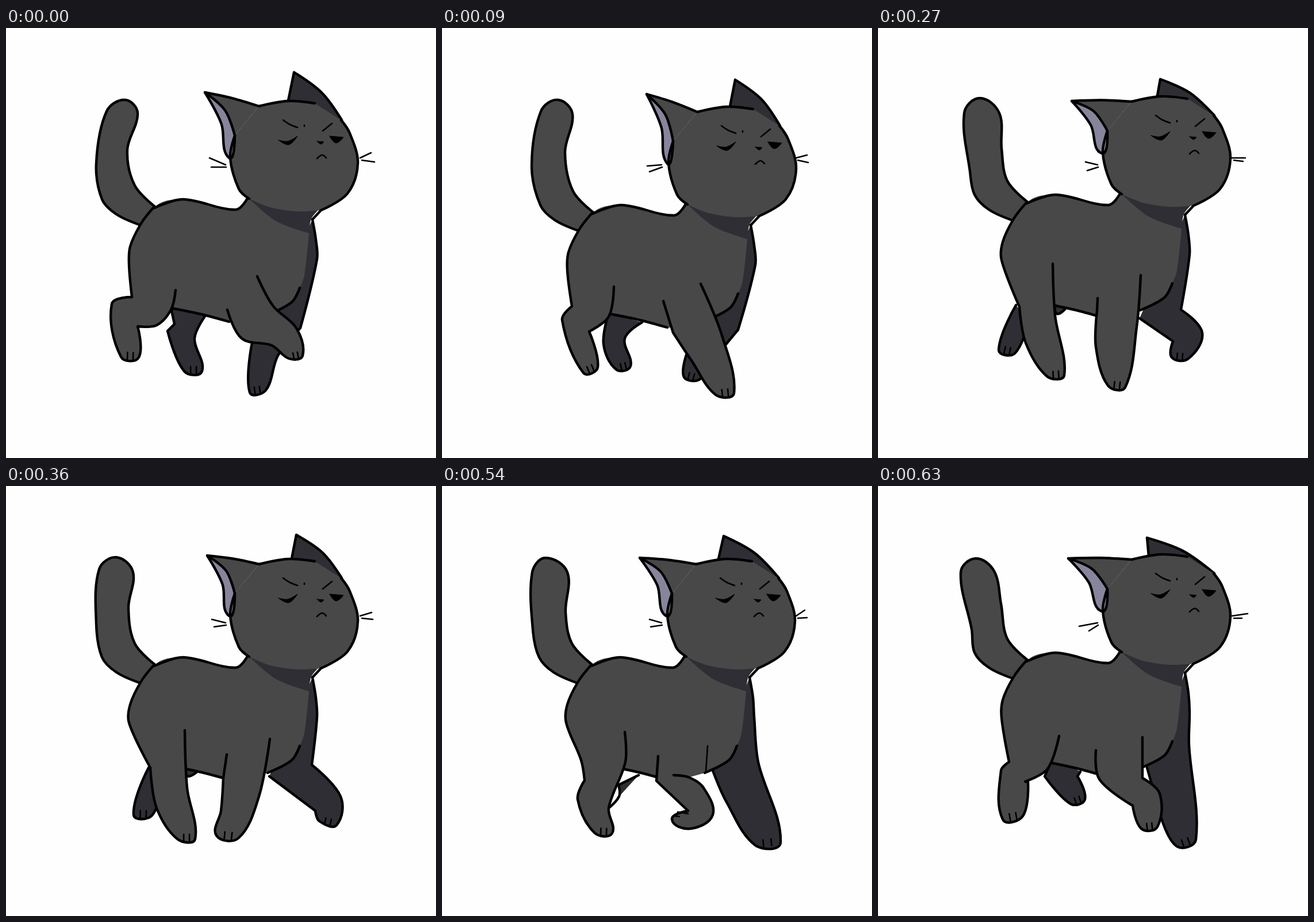
An HTML page that plays this animation: 748 px wide and 748 px high, repeating every 0.72 s.

```html
<!DOCTYPE html>
<html lang="en">
<head>
<meta charset="utf-8">
<title>Walking cat</title>
<style>
html, body { margin: 0; width: 100%; height: 100%; overflow: hidden; background: #fefefe; }
svg { display: block; width: 100%; height: 100%; }
path { fill: none; stroke: #000; stroke-width: 4.4; stroke-linecap: round; stroke-linejoin: round; }
.fur { fill: #484848; }
.dark { fill: #2f2e35; }
.lilac { fill: #87859b; }
.flat { stroke: none; }
.ink { fill: #000; stroke-width: 1; }
.thin { stroke-width: 2.6; }
.pose { visibility: hidden; animation: show 720ms step-end infinite; }
@keyframes show {
  0% { visibility: visible; }
  12.5%, 100% { visibility: hidden; }
}
</style>
</head>
<body>
<svg id="stage" viewBox="0 0 748 748"></svg>
<script>
// Points are joined by a smooth curve. "!" is a corner, "*" the first toe
// of a paw (the next point is the last toe), "|" starts a new stroke.
const hind = [
  "219,468! 184,480 200,572* 231,573 229,519! 262,517 287,490 295,456",
  "226,484! 209,508 246,600* 271,590 256,528! 290,502 299,450",
  "229,490! 231,530 274,602* 300,598 279,528 300,480 299,436",
  "246,485! 257,548 294,606* 324,604 308,500 304,410",
  "251,490! 262,560 298,614* 329,614 315,525 311,425",
  "235,468 257,535! 301,619* 331,621 316,540! 306,540! 327,515 318,433",
  "242,477 248,512! 236,545 265,603* 296,604 290,560 319,480 318,428",
  "228,480! 214,495 217,580* 252,574 261,515! 256,514! 295,492 315,435"
];
const fore = [
  "385,490! 410,540 462,552 492,575* 516,570 505,522 465,484 437,432",
  "385,475 402,530! 435,580 476,638* 508,635 487,535 450,445",
  "380,457 395,530 430,632* 471,636 468,520 456,432",
  "382,470 381,492! 379,555 400,622* 430,625 450,520 457,430",
  "384,467 378,508! 374,565 366,608* 405,612 440,540 459,440",
  "387,463 379,503! 388,567! 360,580* 365,602 405,602 441,570 447,518! 463,460",
  "376,470 373,513! 428,565! 400,580 432,596 471,572 455,525 430,507 403,503",
  "379,460 385,510 443,556! 458,596* 486,593 490,535 460,508! 460,437"
];
const farFore = [
  "512,522! 473,570 452,630* 424,634 428,548! 460,490",
  "515,525! 470,580 447,612* 420,605 432,550! 460,500",
  "514,500! 531,538 500,568 470,564! 470,495",
  "527,490! 564,530 540,575* 511,573 513,545! 455,505",
  "532,485! 582,540 575,590* 545,583 538,565! 458,505",
  "542,470! 590,535 614,598* 585,598 565,576! 500,545 460,505",
  "550,480 589,620* 545,625 495,550 471,495",
  "541,450 553,615* 520,627 492,575! 468,490"
];
const farHind = [
  "287,487 293,515! 281,527! 310,597* 341,597 328,540 347,500",
  "290,495 281,550 303,594* 328,588 318,540 348,512",
  "300,490 285,547! 330,497",
  "240,482 210,560* 238,566 262,510|308,478 311,497 327,487",
  "248,490 222,572* 254,573 275,510|312,490 316,505 335,495",
  "262,540 247,587* 278,588 290,570|316,542 340,525 330,500",
  "342,503 307,520! 308,540 288,562",
  "305,470 290,505! 335,553* 360,545 347,505! 352,497"
];
const tail = [
  "211,212 229,148 207,125 175,145 157,235",
  "214,216 227,150 202,125 172,145 156,240",
  "214,222 224,155 193,122 164,150 158,245",
  "215,210 211,148 177,122 150,148 160,250",
  "213,212 221,150 192,124 162,145 157,240",
  "214,213 229,150 203,126 170,152 155,240",
  "215,220 218,150 180,125 157,150 158,250",
  "214,205 202,148 170,126 144,150 163,250"
];
// near tip, far tip, far base x
const ears = [
  "346,112 501,77 490", "356,115 510,90 500", "350,119 504,88 500", "337,127 491,89 485",
  "350,121 505,85 496", "362,117 515,94 502", "344,125 490,87 480", "331,126 468,90 471"
];
// outer ends: left pair, right pair
const whiskers = [
  "354,226 357,242 635,217 641,233", "357,240 361,250 635,221 637,234",
  "357,234 361,242 635,219 635,229", "361,233 364,248 639,226 635,232",
  "358,232 362,245 636,220 638,232", "361,243 368,235 634,219 635,232",
  "361,232 363,245 631,216 635,229", "350,244 367,252 643,222 633,230"
];
const roots = "382,238 383,242 616,226 619,230";
const extra = { 2: "470,545 488,547", 6: "462,452 459,497|402,574 413,575|410,567 428,570" };
const sway = [[0, 0], [4, 10], [2, 0], [1, -8]];

const rump = "256,313! 235,340 216,380 214,412";
const chest = "533,333 539,368 541,402";
const tailRoot = "262,313 224,274", tailEnd = "167,298 192,324 234,343";
const back = "258,313 308,298 400,316 420,296!";
const belly = "287,487 340,498 388,511", breast = "511,452 497,477 455,499";
const body = `${back} 470,300 528,320! 527,357! 519,430 ${breast} 388,511 340,498 287,487! 232,400`;
const shade = "423,297! 480,311 545,315! 531,332 527,357! 470,336";
const cheek = "398,187! 390,225 405,280 423,297!";
const side = "548,317! 594,288 612,235 598,183 583,160!";
const crown = "537,131! 490,127 440,136!";
const head = `${cheek} 460,312 505,319 ${side} ${crown}`;
const eyes = "474,195! 490,197 507,188! 492,203|563,188! 587,190! 574,200|541,197! 553,198! 548,202";
const brows = "482,160 494,168 507,173|567,166 551,179|519,169 519,171|541,227 550,221 557,226";

const parse = (text, [dx, dy] = [0, 0]) => text.split(" ").map(s => {
  const [x, y] = s.split(",").map(parseFloat);
  return { x: x + dx, y: y + dy, corner: s.endsWith("!"), toe: s.endsWith("*") };
});

function curve(pts, closed) {
  const n = pts.length;
  const get = i => closed ? pts[(i + n) % n] : pts[i];
  const slope = i => {
    const a = get(i - 1), b = get(i + 1);
    if (!a || !b || get(i).corner) return [0, 0];
    const len = Math.hypot(b.x - a.x, b.y - a.y) || 1;
    return [(b.x - a.x) / len, (b.y - a.y) / len];
  };
  let d = `M${pts[0].x} ${pts[0].y}`;
  for (let i = 0; i < (closed ? n : n - 1); i++) {
    const p = get(i), q = get(i + 1), u = slope(i), v = slope(i + 1);
    const k = Math.hypot(q.x - p.x, q.y - p.y) / 3;
    d += `C${[p.x + u[0] * k, p.y + u[1] * k, q.x - v[0] * k, q.y - v[1] * k].map(c => c.toFixed(1))} ${q.x},${q.y}`;
  }
  return d + (closed ? "Z" : "");
}

const path = (d, cls) => `<path class="${cls}" d="${d}"/>`;
const shape = (text, cls = "", closed = false) =>
  path(text.split("|").map(t => curve(parse(t), closed)).join(""), cls);

// Two short lines between the marked toe points, pointing into the paw.
function toes(pts, turn) {
  const i = pts.findIndex(p => p.toe);
  if (i < 0) return "";
  const a = pts[i], b = pts[i + 1];
  const dx = b.x - a.x, dy = b.y - a.y, len = Math.hypot(dx, dy) * turn;
  const nx = dy / len, ny = -dx / len;
  const line = t => {
    const x = a.x + dx * t, y = a.y + dy * t;
    return `M${x - nx * 4} ${y - ny * 4}L${x + nx * 8} ${y + ny * 8}`;
  };
  return path(line(0.36) + line(0.68), "thin");
}

function limb(text, cls, start = [], turn = 1) {
  const parts = text.split("|").map(t => parse(t));
  parts[0] = start.concat(parts[0]);
  return path(parts.map(p => curve(p)).join(""), cls) + toes(parts[0], turn);
}

// Point beside the middle of a-b, pushed out by the given distance.
function bulge(a, b, push) {
  const dx = b.x - a.x, dy = b.y - a.y, len = Math.hypot(dx, dy);
  return { x: (a.x + b.x) / 2 + dy / len * push, y: (a.y + b.y) / 2 - dx / len * push };
}

function nearEar(tip, at) {
  const [top, notch, base] = parse("440,136 398,187! 388,226", at);
  tip.corner = true;
  const outer = [top, bulge(top, tip, -2), tip, notch];
  const inner = [tip, bulge(tip, notch, 11), notch, base, bulge(base, tip, -8)];
  return [path(curve(outer), "fur"), path(curve(inner, true), "lilac")];
}

function farEar(tip, x, at) {
  const [base, end] = parse(`${x - at[0]},131 584,160`, at);
  tip.corner = true;
  return path(curve([base, tip, bulge(tip, end, 9), end]), "dark");
}

function drawPose(i) {
  const at = sway[i % 4];
  const sway2d = inner => `<g transform="translate(${at})">${inner}</g>`;
  const [tip, farTip, farBase] = parse(ears[i]);
  const [ear, lining] = nearEar(tip, at);
  const tailPts = [...parse(tailRoot, at), ...parse(tail[i]), ...parse(tailEnd, at)];
  const ends = parse(whiskers[i]);
  const hairs = parse(roots).map((p, k) => curve([p, ends[k]])).join("");
  return `<g class="pose" style="animation-delay:${i * 90 - 720}ms">` +
    limb(farHind[i], "dark") +
    limb(farFore[i], "dark", parse(chest, at), -1) +
    path(curve(tailPts), "fur") +
    sway2d(shape(body, "fur flat", true) + shape(`${back}|${belly}|${breast}`)) +
    limb(hind[i], "fur", parse(rump, at)) +
    limb(fore[i], "fur") +
    sway2d(shape(shade, "dark flat", true)) +
    farEar(farTip, farBase.x, at) + ear +
    sway2d(shape(head, "fur flat", true)) +
    lining +
    sway2d(shape(`${cheek}|${side}|${crown}|548,317 533,333`) +
      shape(eyes, "ink", true) + shape(brows, "thin")) +
    path(hairs, "thin") +
    (extra[i] ? shape(extra[i], "thin") : "") +
    "</g>";
}

document.getElementById("stage").innerHTML = hind.map((_, i) => drawPose(i)).join("");
</script>
</body>
</html>
```
